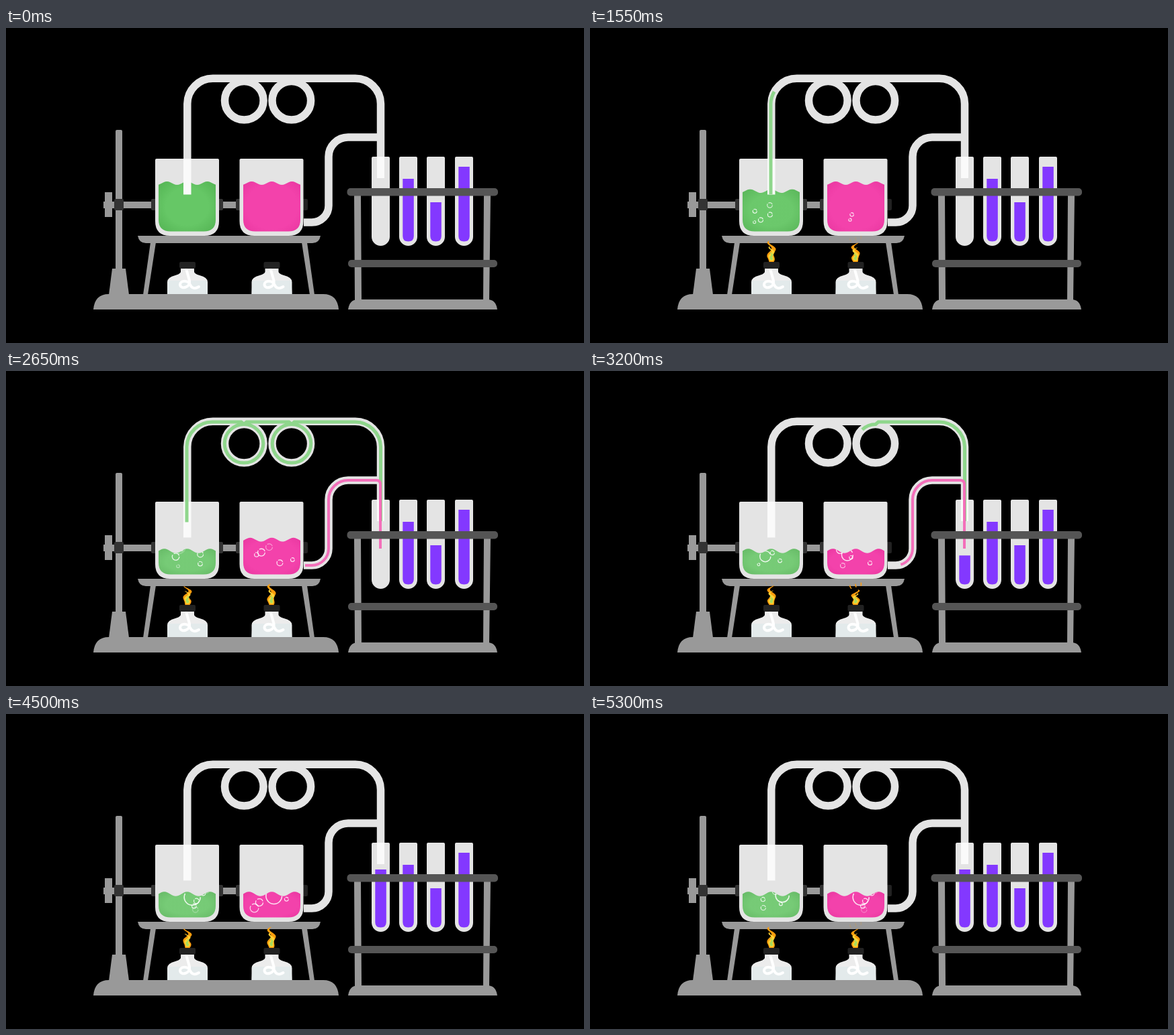
An HTML page that plays this animation: 860x470 px, repeating every 5350 ms.

```html
<!DOCTYPE html>
<html lang="en">
<head>
<meta charset="utf-8">
<title>Chemistry set</title>
<style>
html, body { margin: 0; width: 100%; height: 100%; overflow: hidden; background: #000; }
svg { display: block; width: 860px; height: 470px; }
</style>
</head>
<body>
<svg viewBox="0 0 860 470">
  <defs>
    <path id="beaker" d="M0 2Q0 0 2 0H93Q95 0 95 2V93Q95 115 73 115H22Q0 115 0 93Z" fill="#e4e4e4"/>
    <path id="glass" d="M0 2Q0 0 2 0H25Q27 0 27 2V119.500A13.500 13.500 0 0 1 0 119.500Z" fill="#e4e4e4"/>
    <g id="lamp">
      <path d="M-10 10H10V15Q11 18 18 20Q30 23 30 30V48H-30V30Q-30 23 -18 20Q-11 18 -10 15Z" fill="#ececec"/>
      <path d="M-29 28H29L30 48H-30Z" fill="#e3eaeb"/>
      <path d="M-2 10L3 28C5 38 -10 42 -11 34C-11 27 1 27 4 34C6 39 11 41 17 37" fill="none" stroke="#fff" stroke-width="4" stroke-linecap="round"/>
      <path d="M-10 0H10Q12 0 12 2V8L10 10H-10L-12 8V2Q-12 0 -10 0Z" fill="#222"/>
    </g>
    <radialGradient id="green" r=".75">
      <stop offset=".5" stop-color="#66c766"/><stop offset="1" stop-color="#50b050"/>
    </radialGradient>
    <radialGradient id="pink" r=".75">
      <stop offset=".6" stop-color="#f342ab"/><stop offset="1" stop-color="#e7359e"/>
    </radialGradient>
  </defs>
  <rect width="860" height="470"/>

  <g fill="#999">
    <rect x="163" y="152" width="10" height="210" rx="2"/>
    <path d="M158 359H178L183 398H153Z"/>
    <path d="M145 259H220V269H145ZM322 259H344V269H322Z"/>
    <rect x="147" y="245" width="11" height="37"/>
    <path d="M215 320H223L211 398H204ZM440 320H448L459 398H452Z"/>
    <path d="M130 420Q132 397 153 397H472Q493 397 495 420Z"/>
    <path d="M196 310H468Q466 321 456 321H208Q198 321 196 310Z"/>
    <path d="M518 249H528L529 406H519ZM711 249H721L719 406H710Z"/>
    <path d="M509 420Q511 405 524 405H716Q729 405 731 420Z"/>
  </g>
  <g fill="#333">
    <rect x="161" y="255" width="14" height="17" rx="2"/>
    <rect x="216" y="255" width="8" height="17" rx="2"/>
    <rect x="315" y="255" width="8" height="17" rx="2"/>
    <rect x="342" y="255" width="8" height="17" rx="2"/>
    <rect x="441" y="255" width="8" height="17" rx="2" fill="#222"/>
  </g>

  <use href="#lamp" x="270" y="349"/>
  <use href="#lamp" x="395.500" y="349"/>
  <use href="#beaker" x="222" y="195"/>
  <use href="#beaker" x="347.500" y="195"/>
  <g id="liquids"></g>
  <g id="tubes"></g>

  <g fill="none" stroke="#e4e4e4" stroke-width="11.500">
    <path d="M269.800 196V113A38 38 0 0 1 308 75.300H519A38 38 0 0 1 557.500 113V193"/>
    <path d="M443 290H455A25 25 0 0 0 480 265V192A29 29 0 0 1 509 163H557"/>
    <circle cx="354.300" cy="108.300" r="28.800"/>
    <circle cx="424.800" cy="108.300" r="28.800"/>
  </g>
  <path d="M264 195H275.500V248.500H264ZM552 192H563V224H552Z" fill="#fafafa"/>
  <path id="greenFlow" fill="none" stroke="#8fd68c" stroke-width="5"
    d="M269 248V113A38 38 0 0 1 308 76H350L354 79.500a28.800 28.800 0 1 1 0 57.600a28.800 28.800 0 1 1 0 -57.600L358 76H421L425 79.500a28.800 28.800 0 1 1 0 57.600a28.800 28.800 0 1 1 0 -57.600L429 76H519A38 38 0 0 1 557.500 113V224"/>
  <path id="pinkFlow" fill="none" stroke="#f370ba" stroke-width="4"
    d="M445 290H455A25 25 0 0 0 480 265V192A29 29 0 0 1 509 163H551Q557 163 557 169V265"/>

  <rect x="507.500" y="239" width="224.500" height="11.500" rx="5" fill="#555"/>
  <rect x="509" y="346" width="222" height="11" rx="5" fill="#555"/>
  <g id="flames"></g>
</svg>
<script>
const LOOP = 5350, STEP = 50, TAU = 2 * Math.PI;
const FLICKER = 937.5, PINK_DELAY = 800;

const $ = id => document.getElementById(id);
const clamp = v => Math.max(0, Math.min(1, v));
const ramp = (t, from, to) => clamp((t - from) / (to - from));
const mix = (a, b, u) => a + (b - a) * u;
const ease = u => u < .5 ? 2 * u * u : 1 - 2 * (1 - u) * (1 - u);

function set(el, attrs) {
  for (const key in attrs) el.setAttribute(key, attrs[key]);
  return el;
}
function add(parent, name, attrs = {}) {
  return set(parent.appendChild(document.createElementNS('http://www.w3.org/2000/svg', name)), attrs);
}
const show = visible => visible ? 'visible' : 'hidden';

function randomizer(seed) {
  return () => (seed = seed * 16807 % 2147483647) / 2147483647;
}

// Bubbles leave the bottom at a steady rate and get larger later in the loop.
const BUBBLE_LIFE = 650;
const random = randomizer(2024);
const bubbles = Array.from({ length: 40 }, (_, i) => {
  const birth = 450 + i * 125 + random() * 80;
  return {
    birth,
    x: 43 + (random() - .5) * mix(20, 60, ramp(i, 0, 8)),
    drift: (random() - .5) * 14,
    r: 3 + random() ** 3 * mix(5, 11, birth / LOOP)
  };
});

function drawBubble(el, { birth, x, drift, r }, t) {
  const age = (t - birth) / BUBBLE_LIFE, size = r * mix(.5, 1.3, clamp(age));
  set(el, {
    cx: x + drift * age, cy: mix(294, 260, age), r: size,
    'stroke-width': 1 + size * .05,
    'stroke-dasharray': [3.6, .4, 1.8, .5].map(k => k * size).join(' '),
    opacity: .85 * Math.min(ramp(age, 0, .15), ramp(age, 1, .85))
  });
}

function makeLiquid({ name, x, delay, drain, paleness }) {
  const group = add($('liquids'), 'g', { transform: `translate(${x})` });
  const clip = add(add(group, 'clipPath', { id: name + 'Clip' }), 'path');
  const body = add(group, 'path', { fill: `url(#${name})` });
  const foam = add(group, 'g', { 'clip-path': `url(#${name}Clip)`, fill: 'none', stroke: '#fff' });
  const rings = bubbles.map(() => add(foam, 'circle'));
  return t => {
    const drained = ramp(t, ...drain);
    const level = mix(231.5, 268.5, drained);
    const wave = mix(2.5, 3.3, drained), period = mix(30, 34, drained);
    const surface = [];
    for (let i = 0; i <= 85; i += 2.5)
      surface.push(`${i} ${level - wave * Math.cos((i - 42.5) / period * TAU)}`);
    const d = `M${surface.join('L')}V286Q85 303.5 67 303.5H18Q0 303.5 0 286Z`;
    set(clip, { d });
    set(body, { d, 'fill-opacity': 1 - paleness * drained });
    rings.forEach((ring, i) => drawBubble(ring, bubbles[i], t - delay));
  };
}

function makeFlow(id) {
  const path = $(id), length = path.getTotalLength();
  return (head, tail) => set(path, {
    'stroke-dasharray': `${(head - tail) * length} ${length * 2}`,
    'stroke-dashoffset': -tail * length,
    visibility: show(head > tail)
  });
}

function makeTube(x) {
  add($('tubes'), 'use', { href: '#glass', x, y: 192 });
  const fill = add($('tubes'), 'path', { fill: '#8338ff', transform: `translate(${x + 5.3})` });
  return top => {
    const r = Math.min(8, 318.5 - top);
    set(fill, {
      d: `M0 ${top}H16.5V${318.5 - r}Q16.5 318.5 8.2 318.5Q0 318.5 0 ${318.5 - r}Z`,
      visibility: show(top < 318)
    });
  };
}

// A ribbon rising from the wick, bent by a wave that travels upwards.
function flameOutline(u) {
  const height = 27 + 4.5 * Math.cos(TAU * (u - .8));
  const left = [], right = [];
  for (let v = 0; v <= 1.001; v += .05) {
    const sway = 5.5 * v * Math.sin(TAU * (1.6 * v - u - .87));
    const half = (6.8 - 3 * v) * Math.sqrt(clamp(1.02 - v)) * Math.sqrt(clamp(.25 + v * 3));
    left.push(`${sway - half} ${-height * v}`);
    right.unshift(`${sway + half} ${-height * v}`);
  }
  return `M${left.concat(right).join('L')}Z`;
}

function makeFlame({ x, start, phase }) {
  const group = add($('flames'), 'g');
  const layers = ['#ff9d0c', '#ffd335', '#a8dc5c'].map((fill, i) =>
    add(group, 'path', { fill, transform: `translate(0 ${-1.5 * i}) scale(${1 - .3 * i})` }));
  const sparks = [-1, 0, 1].map(side =>
    ({ side, el: add(group, 'path', { fill: 'none', stroke: '#ff9d0c', 'stroke-width': 1.5 }) }));
  return t => {
    const grown = ramp(t, start, start + 250);
    const u = ((t - phase) / FLICKER + 2) % 1;
    const d = flameOutline(u);
    layers.forEach(el => set(el, { d }));
    sparks.forEach(({ side, el }) => set(el, {
      d: `M${side * 8} ${mix(-24, -37, ramp(u, .05, .6)) - 2 * side}q${side} 2 ${1 - side} 5`,
      opacity: u > .05 ? ramp(u, .65, .35) : 0
    }));
    set(group, { transform: `translate(${x} 349) scale(${grown})`, visibility: show(grown) });
  };
}

const liquids = [
  makeLiquid({ name: 'green', x: 227, delay: 0, drain: [1150, 2400], paleness: .13 }),
  makeLiquid({ name: 'pink', x: 353, delay: PINK_DELAY, drain: [2050, 3150], paleness: 0 })
];
const flames = [
  makeFlame({ x: 270, start: 0, phase: 750 }),
  makeFlame({ x: 395, start: 725, phase: 987 })
];
const greenFlow = makeFlow('greenFlow'), pinkFlow = makeFlow('pinkFlow');
const [fillFirst, ...others] = [544, 585, 626, 668].map(makeTube);
[225, 260, 207].forEach((top, i) => others[i](top));

function draw(t) {
  liquids.forEach(liquid => liquid(t));
  flames.forEach(flame => flame(t));
  greenFlow(ease(ramp(t, 1150, 2550)), ease(ramp(t, 2530, 3630)));
  pinkFlow(ease(ramp(t, 2050, 2650)), ease(ramp(t, 3100, 3700)));
  fillFirst(mix(318.5, 232, ramp(t, 2700, 3700)));
}

function frame() {
  draw(Math.floor(performance.now() % LOOP / STEP) * STEP);
  requestAnimationFrame(frame);
}
frame();
</script>
</body>
</html>
```
